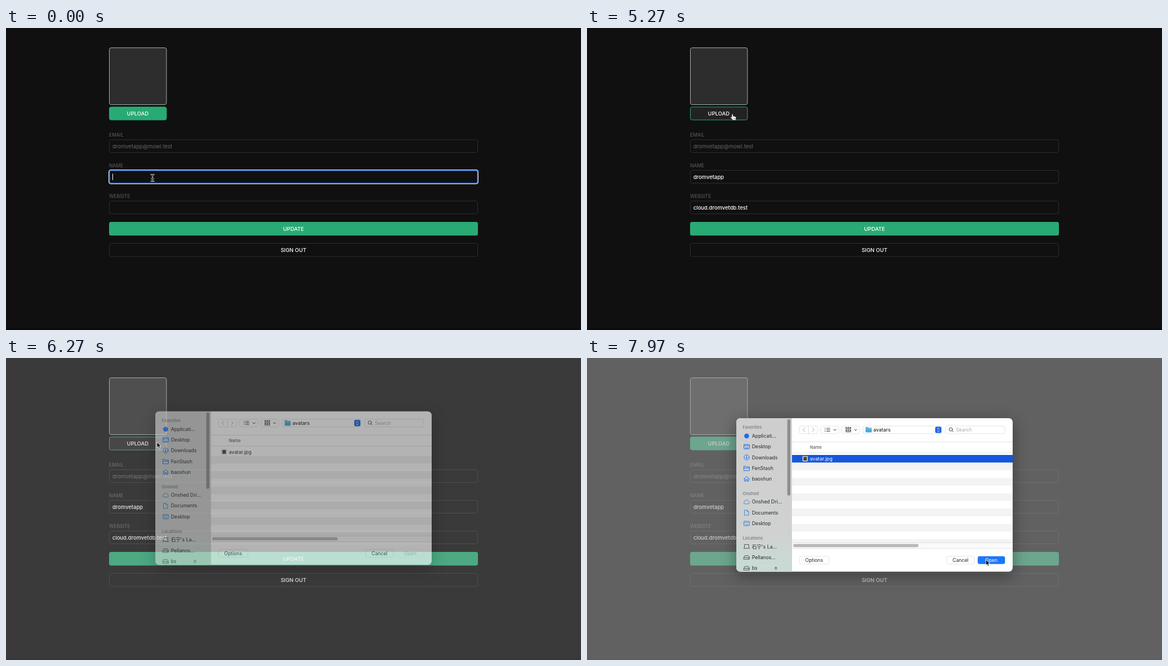
Write an HTML page that moves like this. It is 1032 px wide and 542 px high and loops after 8000 ms.

```html
<!DOCTYPE html>
<html lang="en">
<head>
<meta charset="utf-8">
<title>Profile form</title>
<style>
html, body { margin: 0; width: 100%; height: 100%; overflow: hidden; background: #101010; }
svg { display: block; width: 1032px; height: 542px; font: 400 9.6px Inter, "Noto Sans CJK SC", sans-serif; }
text { white-space: pre; }
.label { font-size: 8.6px; fill: #606060; }
.field { fill: #101010; stroke: #2e2e2e; }
.value { font-weight: 500; font-size: 9.5px; fill: #fff; }
.btn { font-weight: 500; font-size: 9.5px; fill: #fff; text-anchor: middle; }
.mid { text-anchor: middle; }
.ring { fill: none; }
.caret { fill: #fff; }

#sheet { font-size: 8.75px; fill: #262626; animation: drop 8s linear infinite; }
#panel { filter: drop-shadow(0 7px 14px rgba(0, 0, 0, .38)); }
.head { font-size: 7.7px; font-weight: 600; fill: #838383; }
.ctl { fill: #fff; stroke: #dcdcdc; stroke-width: .8; }
.ico { fill: none; stroke-width: 1; stroke-linejoin: round; stroke-linecap: round; }
.rule { stroke: #e0e0e0; stroke-width: 1; }

#veil { fill: #a5a5a5; animation: veil 8s linear infinite; }
#upload { animation: hover 8s linear infinite; }
#mouse { animation: move 8s ease-in-out infinite; }

@keyframes drop {
  0%, 77.125% { opacity: 0; transform: translateY(-28px); }
  77.875% { opacity: .36; transform: translateY(-20px); }
  79.125% { opacity: .99; transform: translateY(-1px); }
  79.75%, 100% { opacity: 1; transform: none; }
}
@keyframes veil {
  0%, 77.125% { opacity: 0; }
  77.875% { opacity: .1; }
  79.125% { opacity: .535; }
  79.75%, 100% { opacity: .55; }
}
@keyframes hover {
  0%, 55.375% { fill: #29aa74; }
  57.875%, 86.25% { fill: #222; }
  88.75%, 100% { fill: #29aa74; }
}
@keyframes move {
  0%, 38.125% { transform: translate(263px, 269px); }
  43.75%, 49.375% { transform: translate(229px, 316px); }
  57% { transform: translate(249.6px, 157px); }
  59.125%, 62.5% { transform: translate(250px, 156.5px); }
  65%, 69.125% { transform: translate(261px, 154px); }
  71.25%, 85.625% { transform: translate(271px, 151px); }
  91.625%, 93.5% { transform: translate(425px, 181px); }
  99.125%, 100% { transform: translate(716px, 362px); }
}
</style>
</head>
<body>
<svg viewBox="0 0 1032 542" xmlns="http://www.w3.org/2000/svg">
  <defs>
    <clipPath id="round"><rect x="268" y="108" width="496" height="275.5" rx="7"/></clipPath>
    <linearGradient id="side" x1="0" y1="0" x2="0" y2="1">
      <stop offset="0" stop-color="#cecece"/>
      <stop offset=".75" stop-color="#d0d1d1"/>
      <stop offset=".93" stop-color="#c9dad4"/>
      <stop offset="1" stop-color="#cbd9d4"/>
    </linearGradient>
    <g id="folder"><path d="M-5 4V-3.5H-1.5L-.3-2.3H5V4ZM-5-.3H5"/></g>
    <g id="desk"><rect x="-5" y="-4" width="10" height="8" rx="1"/><path d="M-5-1.8H5M-3 2.2H3"/></g>
    <g id="drive"><path d="M-5 .5L-3.2-3H3.2L5 .5V3.5H-5ZM-5 .5H5M2.6 2H3.2"/></g>
    <path id="down" d="M-2.3-1.1L0 1.2L2.3-1.1"/>
  </defs>

  <rect width="1032" height="542" fill="#101010"/>
  <rect y="538" width="1032" height="4" fill="#0c0c0c"/>

  <rect x="185.5" y="35.5" width="102.5" height="102" rx="3.2" fill="#2d2d2d" stroke="#bdbdbd" stroke-width=".9"/>
  <rect id="upload" x="185.5" y="141.8" width="102.5" height="23.2" rx="3.2" stroke="#29aa74"/>
  <text class="btn" x="236.5" y="157.2">UPLOAD</text>

  <text class="label" x="185" y="194.5">EMAIL</text>
  <rect class="field" x="185.5" y="200.5" width="661" height="23" rx="3.2"/>
  <text x="191" y="215.7" fill="#666">dromvetapp@mowl.test</text>

  <text class="label" x="185" y="249.6">NAME</text>
  <rect class="field" x="185.5" y="255.5" width="661" height="23" rx="3.2"/>
  <text class="value" id="name" x="191" y="270.9"></text>

  <text class="label" x="185" y="304.7">WEBSITE</text>
  <rect class="field" x="185.5" y="310.5" width="661" height="23" rx="3.2"/>
  <text class="value" id="site" x="191" y="326"></text>

  <g id="focus">
    <rect class="ring" x="185.7" y="255.7" width="660.6" height="22.8" rx="2.6" stroke="#1f5bd0" stroke-width="2"/>
    <rect class="ring" x="184.6" y="254.6" width="662.8" height="25" rx="3.6" stroke="#d5e3f8" stroke-width="1.3"/>
    <rect class="caret" id="caret" y="261.5" width="1" height="11.5"/>
  </g>

  <rect x="185" y="348" width="662" height="24.4" rx="3.5" fill="#29aa74"/>
  <text class="btn" x="516" y="364">UPDATE</text>
  <rect class="field" x="185.5" y="386.5" width="661" height="23.5" rx="3.2"/>
  <text class="btn" x="516" y="402">SIGN OUT</text>

  <rect id="veil" width="1032" height="542"/>

  <g id="sheet">
    <rect id="panel" x="268" y="108" width="496" height="275.5" rx="7" fill="#fff"/>
    <g clip-path="url(#round)">
      <rect x="268" y="108" width="99" height="276" fill="url(#side)"/>
      <path d="M367.3 108V384" stroke="#c2c2c2" stroke-width=".8"/>
      <rect x="359.5" y="110" width="5.5" height="137" rx="2.7" fill="#8e8e8e"/>
      <g id="places"></g>
      <path d="M336.3 377.4L339 373.9L341.7 377.4ZM336.3 378.6H341.7V379.6H336.3Z" fill="#777"/>

      <rect class="ctl" x="381.4" y="122" width="32.4" height="13.8" rx="3"/>
      <path class="ico" d="M397.6 122V136" stroke="#dcdcdc"/>
      <path class="ico" d="M390.7 125.7L387.6 128.9L390.7 132.1M404.6 125.7L407.7 128.9L404.6 132.1" stroke="#a8a8a8"/>
      <rect class="ctl" x="419.4" y="122" width="32.6" height="13.8" rx="3"/>
      <path class="ico" d="M427 126H427.6M430 126H436M427 128.8H427.6M430 128.8H436M427 131.6H427.6M430 131.6H436" stroke="#444"/>
      <rect class="ctl" x="457.4" y="122" width="32" height="13.8" rx="3"/>
      <path d="M464 125.2H474M464 130.2H474" stroke="#555" stroke-width="2.6" stroke-dasharray="2.6 1.1"/>
      <path d="M464 127.7H474M464 132.7H474" stroke="#555" stroke-width="1"/>
      <g class="ico" stroke="#333" stroke-width="1.2">
        <use href="#down" x="445" y="129"/><use href="#down" x="482" y="129"/>
      </g>
      <rect class="ctl" x="495.4" y="122" width="141.6" height="13.8" rx="3"/>
      <path d="M500 133V124.8Q500 124 501 124H504L505.2 125.2H510Q511 125.2 511 126V133Q511 133.6 510 133.6H501Q500 133.6 500 133Z" fill="#4aa9dc"/>
      <path d="M500 127.2H511" stroke="#8bd0f2" stroke-width="1"/>
      <text x="514" y="132" font-weight="500">avatars</text>
      <rect x="625" y="123.2" width="11" height="11.4" rx="2.6" fill="#1765e2"/>
      <path class="ico" d="M628.6 127.6L630.5 125.6L632.4 127.6M628.6 130.2L630.5 132.2L632.4 130.2" stroke="#fff"/>
      <rect class="ctl" x="643.4" y="122" width="106.6" height="13.8" rx="3"/>
      <path class="ico" d="M655.2 130.4L657.4 132.6" stroke="#444" stroke-width="1.2"/>
      <circle class="ico" cx="652.9" cy="128.1" r="3" stroke="#444"/>
      <text x="662" y="132" fill="#a9a9a9">Search</text>

      <path class="rule" d="M368 150.7H764M368 170.2H764"/>
      <text x="400" y="162.9" font-size="7.6" fill="#444">Name</text>
      <g id="rows" fill="#f3f3f3"></g>
      <rect id="pick" x="368" y="174" width="396" height="13.6" fill="#1557dc"/>
      <rect x="387" y="176.2" width="9" height="9" rx=".8" fill="#e9e7e2" stroke="#b9b9b9" stroke-width=".5"/>
      <rect x="388.4" y="177.4" width="6.2" height="6.6" fill="#4b4131"/>
      <text id="file" x="400" y="183.8">avatar.jpg</text>

      <rect x="368" y="331.5" width="396" height="10" fill="#fafafa"/>
      <path class="rule" d="M368 331.5H764M368 341.8H764"/>
      <rect x="370" y="333.8" width="225" height="5.6" rx="2.8" fill="#b9b9b9"/>

      <rect class="ctl" x="381.4" y="355.8" width="52.8" height="14" rx="3.2"/>
      <text class="mid" x="407.6" y="366">Options</text>
      <rect class="ctl" x="645.4" y="355.8" width="50" height="14" rx="3.2"/>
      <text class="mid" x="670.4" y="366">Cancel</text>
      <rect id="open" x="701" y="355.6" width="49.5" height="14.4" rx="3.4" stroke="#ececec" stroke-width=".6"/>
      <text id="openText" class="mid" x="725.7" y="366">Open</text>
    </g>
  </g>

  <g id="mouse">
    <g id="beam" fill="none" stroke-linecap="round">
      <path d="M-2.4-5.8Q0-5.8 0-4V4.2Q0 6 -2.4 6M2.4-5.8Q0-5.8 0-4M0 4.2Q0 6 2.4 6M-1.6 1.6H1.6" stroke="#e2e2e2" stroke-width="2.2"/>
      <path d="M-2.4-5.8Q0-5.8 0-4V4.2Q0 6 -2.4 6M2.4-5.8Q0-5.8 0-4M0 4.2Q0 6 2.4 6M-1.6 1.6H1.6" stroke="#151515" stroke-width=".9"/>
    </g>
    <path id="arrow" d="M0 0V9.8L2.2 7.8L3.7 11.3L5.5 10.5L4 7.1H7Z" fill="#000" stroke="#fff" stroke-width=".8" stroke-linejoin="round"/>
    <g id="hand" stroke="#111" stroke-width=".7" stroke-linejoin="round">
      <path d="M-1.2 1Q0-.8 1.2 1V4.2Q2.4 3.6 3.2 4.6Q4.4 4.1 5.1 5.2Q7 5 7 7L6.2 9.6V11.8H.2V10.4L-3.5 6.9Q-3.6 5.2 -2.1 5.6L-1.2 6.5Z" fill="#fff"/>
      <path d="M1.8 7.4V9.6M3.4 7.4V9.6M4.9 7.4V9.6" fill="none" stroke-width=".5"/>
    </g>
  </g>
</svg>

<script>
const LOOP = 8000;
const $ = id => document.getElementById(id);
const show = (id, on) => $(id).setAttribute('visibility', on ? 'visible' : 'hidden');
const within = (t, a, b) => t >= a && t < b;

// Sidebar: [y, text, icon, colour]; no icon means a heading
const BLUE = '#1a6eef', SKY = '#3d8fd6', GREY = '#555';
const icons = {
  dot: `<circle r="4.4" fill="${BLUE}" stroke="none"/>`,
  desk: '<use href="#desk"/>',
  folder: '<use href="#folder"/>',
  drive: '<use href="#drive"/>',
  get: '<circle r="4.6"/><path d="M0-2.4V2.2M-1.8.5L0 2.3L1.8.5"/>',
  home: '<path d="M-5 .2L0-4.5L5 .2M-3.6-.8V4.2H-1.2V1H1.2V4.2H3.6V-.8"/>',
  cloud: '<path d="M-3 3.5Q-5.4 3.3 -5.2 1.2Q-5-.4 -3.3-.6Q-3-3.6 0-3.6Q2.6-3.5 3.1-.9Q5.3-.6 5.2 1.4Q5 3.5 3 3.5Z"/>',
  doc: '<path d="M-3.5-4.6H.8L3.5-1.9V4.6H-3.5ZM.8-4.6V-1.9H3.5"/>',
  laptop: '<path d="M-4 2.2V-3.6H4V2.2M-5.4 3.2H5.4"/>'
};
const places = [
  [124.5, 'Favorites'],
  [140, 'Applicati...', 'dot', BLUE],
  [159.2, 'Desktop', 'desk', BLUE],
  [178.4, 'Downloads', 'get', BLUE],
  [197.7, 'FenStash', 'folder', BLUE],
  [217, 'baoshun', 'home', BLUE],
  [243, 'Onshed'],
  [258.3, 'Onshed Dri...', 'cloud', SKY],
  [277.6, 'Documents', 'doc', SKY],
  [297, 'Desktop', 'desk', SKY],
  [323, 'Locations'],
  [338.4, "石宁's La...", 'laptop', GREY],
  [357.7, 'Pellanos...', 'drive', GREY],
  [377, 'bs', 'drive', GREY]
];
$('places').innerHTML = places.map(([y, text, icon, colour]) => icon
  ? `<g class="ico" transform="translate(286.5 ${y})" stroke="${colour}">${icons[icon]}</g><text x="296" y="${y + 3.1}">${text}</text>`
  : `<text class="head" x="279.5" y="${y + 2.8}">${text}</text>`).join('');

let rows = '';
for (let y = 187.8; y < 331; y += 27.5) rows += `<rect x="368" y="${y}" width="396" height="13.7"/>`;
$('rows').innerHTML = rows;

const NAME = 'dromvetapp', SITE = 'cloud.dromvetdb.test';
const keys = [640, 1030, 1130, 1230, 1370, 1700, 1800, 2300, 2430, 2570];

function pointer(t) {
  if (t < 640) return 'beam';
  if (t < 3050) return '';
  if (within(t, 4440, 6200)) return 'hand';
  return within(t, 3050, 3200) || within(t, 3400, 4050) || within(t, 4145, 4210) ? 'beam' : 'arrow';
}

function draw(t) {
  $('name').textContent = NAME.slice(0, keys.filter(k => t >= k).length);
  $('site').textContent = t >= 3900 ? SITE : '';

  const onSite = t >= 3600;
  const width = $(onSite ? 'site' : 'name').getComputedTextLength();
  $('caret').setAttribute('x', 191 + width);
  $('focus').setAttribute('transform', `translate(0 ${onSite ? 55 : 0})`);
  show('focus', t < 5200);

  const kind = pointer(t);
  for (const id of ['beam', 'arrow', 'hand']) show(id, id === kind);

  const picked = t >= 7430;
  show('pick', picked);
  $('file').setAttribute('fill', picked ? '#fff' : '#262626');
  $('open').setAttribute('fill', picked ? '#1a77fb' : '#fff');
  $('openText').setAttribute('fill', picked ? '#fff' : '#bdbdbd');
}

let start;
function tick(now) {
  start ??= now;
  draw((now - start) % LOOP);
  requestAnimationFrame(tick);
}
draw(0);
requestAnimationFrame(tick);
</script>
</body>
</html>
```
